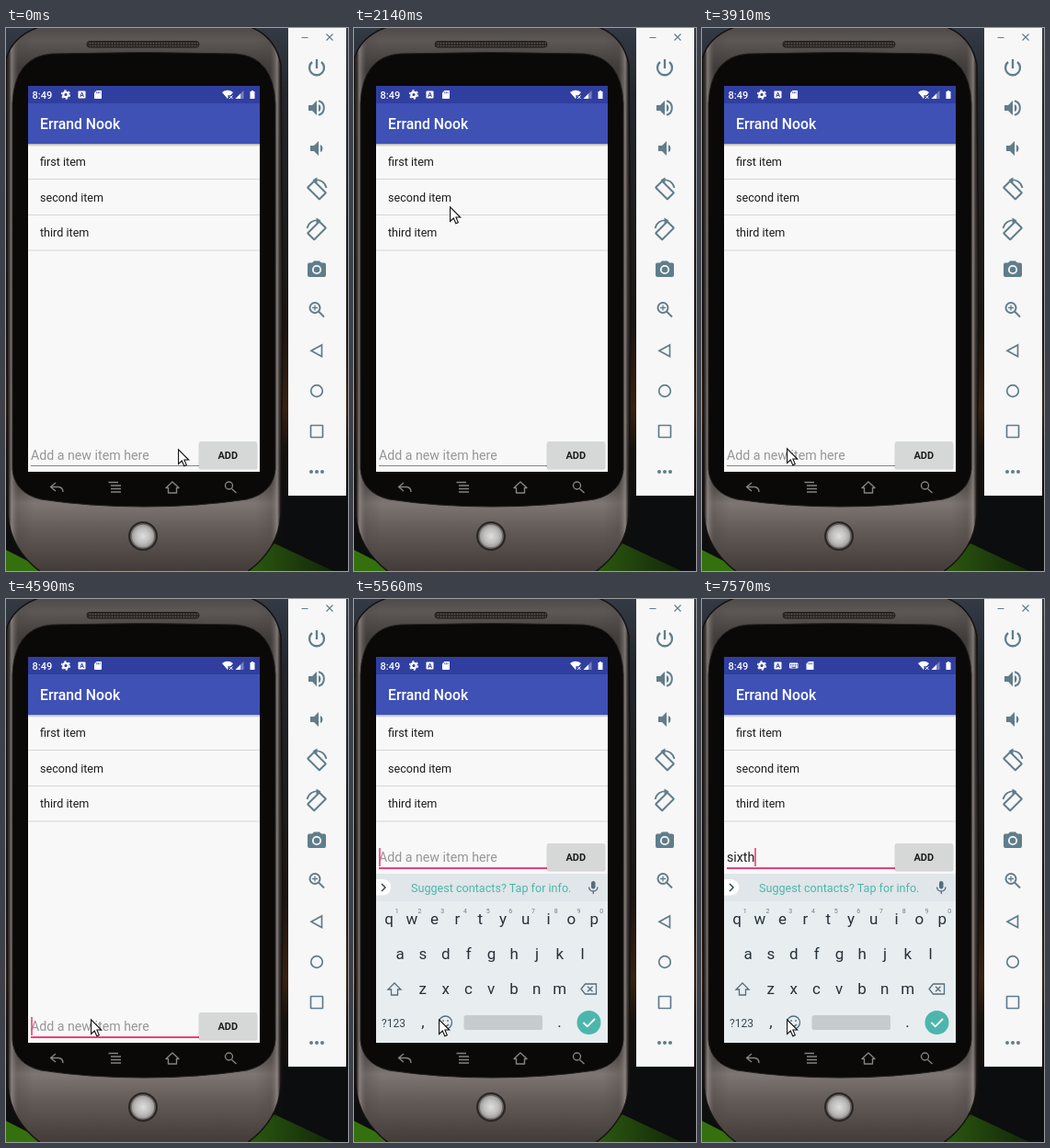
Write an HTML page that moves like this. It is 372x591 px and loops after 8000 ms.

```html
<!DOCTYPE html>
<html lang="en">
<head>
<meta charset="utf-8">
<title>Errand Nook</title>
<style>
html, body { margin: 0; width: 100%; height: 100%; overflow: hidden; background: #0b0d0e; }
svg { display: block; width: 372px; height: 591px; }
text { font-family: Roboto, Arial, sans-serif; fill: #1c1c1c; }
.item { font-size: 12.6px; }
.edit { font-size: 14.2px; }
.medium { font-weight: 500; }
.mid { text-anchor: middle; }
.key { font-size: 17px; fill: #263238; text-anchor: middle; }
.digit { font-size: 7px; fill: #6f7f87; text-anchor: middle; }
.line { fill: none; stroke: currentColor; stroke-width: 2; }
.tools { color: #607d8b; fill: #607d8b; }
.nav { color: #85827f; fill: none; stroke: currentColor; stroke-width: 1.4; stroke-linejoin: round; }

.anim, .type tspan { animation: 8s step-end infinite; }
#cursor { animation-name: move; }
#field { animation-name: pan; }
#hint { animation-name: hint; }
#accent { animation-name: focus; transform-origin: 92px 476px; }
#caret { animation-name: caret; }
#keyboard { animation-name: keyboard; }
#card { animation-name: card; }
#ime { animation-name: ime; }
.type tspan:nth-child(1) { animation-name: s; }
.type tspan:nth-child(2) { animation-name: i; }
.type tspan:nth-child(3) { animation-name: x; }
.type tspan:nth-child(4) { animation-name: t; }
.type tspan:nth-child(5) { animation-name: h; }

@keyframes move {
  0% { transform: translate(187px, 458px); }
  6.25% { transform: translate(206px, 458px); }
  8.125% { transform: translate(221px, 457px); }
  9.625% { transform: translate(186px, 453px); }
  11.5% { transform: translate(150px, 447px); }
  13% { transform: translate(119px, 444px); }
  14.875% { transform: translate(100px, 426px); }
  16.5% { transform: translate(64px, 284px); }
  18.375% { transform: translate(56px, 207px); }
  20.25% { transform: translate(64px, 209px); }
  21.75% { transform: translate(82px, 206px); }
  23.375% { transform: translate(97px, 202px); }
  25.25% { transform: translate(101px, 198px); }
  26.75% { transform: translate(104px, 194px); }
  28.25% { transform: translate(106px, 192px); }
  30.125% { transform: translate(106px, 191px); }
  35.5% { transform: translate(106px, 217px); }
  37% { transform: translate(106px, 300px); }
  38.5% { transform: translate(106px, 380px); }
  40.125% { transform: translate(98px, 446px); }
  41.625% { transform: translate(91px, 476px); }
  45% { transform: translate(91px, 475px); }
  47% { transform: translate(91px, 462px); }
  48.875%, 100% { transform: translate(92px, 457px); }
}
@keyframes pan {
  0% { transform: none; }
  64.375%, 100% { transform: translateY(-184px); }
}
@keyframes hint {
  0% { visibility: visible; }
  72.875%, 100% { visibility: hidden; }
}
@keyframes focus {
  0% { transform: scaleX(0); }
  55.875% { transform: scaleX(.6); }
  57.375%, 100% { transform: none; }
}
@keyframes caret {
  0% { opacity: 0; transform: none; }
  55.875% { opacity: 1; transform: none; }
  61.25% { opacity: 0; transform: none; }
  69.5% { opacity: 1; transform: none; }
  72.875% { opacity: 1; transform: translateX(7px); }
  81.625% { opacity: 1; transform: translateX(10.5px); }
  85.25% { opacity: 1; transform: translateX(17.5px); }
  89.125% { opacity: 1; transform: translateX(22.2px); }
  94.625%, 100% { opacity: 1; transform: translateX(30px); }
}
@keyframes keyboard {
  0% { visibility: hidden; }
  69.5%, 100% { visibility: visible; }
}
@keyframes card {
  0% { transform: none; }
  74.375% { transform: translateX(7px); }
  75.875% { transform: translateX(14px); }
  81.625%, 100% { transform: translateX(17.5px); }
}
@keyframes ime {
  0% { opacity: 0; }
  74.375% { opacity: .2; }
  75.875% { opacity: .6; }
  81.625%, 100% { opacity: 1; }
}
@keyframes s { 0% { visibility: hidden; } 72.875%, 100% { visibility: visible; } }
@keyframes i { 0% { visibility: hidden; } 81.625%, 100% { visibility: visible; } }
@keyframes x { 0% { visibility: hidden; } 85.25%, 100% { visibility: visible; } }
@keyframes t { 0% { visibility: hidden; } 89.125%, 100% { visibility: visible; } }
@keyframes h { 0% { visibility: hidden; } 94.625%, 100% { visibility: visible; } }
</style>
</head>
<body>
<svg viewBox="0 0 372 591" xmlns="http://www.w3.org/2000/svg">
  <defs>
    <linearGradient id="sky" x2="0" y2="1">
      <stop offset="0" stop-color="#343a45"/><stop offset=".12" stop-color="#22272d"/>
      <stop offset=".55" stop-color="#1b1511"/><stop offset=".7" stop-color="#38210f"/>
      <stop offset=".78" stop-color="#15110e"/><stop offset="1" stop-color="#0b0d0e"/>
    </linearGradient>
    <linearGradient id="body" x2="0" y2="1">
      <stop offset="0" stop-color="#4b4745"/><stop offset=".03" stop-color="#5d5855"/>
      <stop offset=".08" stop-color="#3d3937"/><stop offset=".83" stop-color="#4c4643"/>
      <stop offset=".87" stop-color="#7d7672"/><stop offset=".92" stop-color="#625a56"/>
      <stop offset="1" stop-color="#3f3936"/>
    </linearGradient>
    <linearGradient id="sides" gradientUnits="userSpaceOnUse" x1="0" x2="301" y1="0" y2="0">
      <stop offset="0" stop-color="#141110"/><stop offset=".012" stop-color="#3b3634" stop-opacity=".9"/>
      <stop offset=".02" stop-color="#8e8783" stop-opacity=".8"/><stop offset=".045" stop-color="#4a4441" stop-opacity=".3"/>
      <stop offset=".1" stop-color="#4a4441" stop-opacity="0"/><stop offset=".9" stop-color="#4a4441" stop-opacity="0"/>
      <stop offset=".955" stop-color="#4a4441" stop-opacity=".3"/><stop offset=".98" stop-color="#8e8783" stop-opacity=".8"/>
      <stop offset=".988" stop-color="#3b3634" stop-opacity=".9"/><stop offset="1" stop-color="#141110"/>
    </linearGradient>
    <linearGradient id="grass" x2="1">
      <stop offset="0" stop-color="#2c5a10"/><stop offset="1" stop-color="#122608"/>
    </linearGradient>
    <linearGradient id="shade" x2="0" y2="1">
      <stop offset="0" stop-opacity=".3"/><stop offset="1" stop-opacity="0"/>
    </linearGradient>
    <radialGradient id="ball">
      <stop offset="0" stop-color="#dededd"/><stop offset=".6" stop-color="#c0bebd"/>
      <stop offset="1" stop-color="#989593"/>
    </radialGradient>
    <pattern id="mesh" width="3" height="3" patternUnits="userSpaceOnUse">
      <rect width="3" height="3" fill="#2b2826"/><circle cx="1.5" cy="1.5" r=".8" fill="#5f5956"/>
    </pattern>
    <path id="case" d="M0 34Q8 5 46-4H256Q292 4 299 40L301 300L299 530Q296 570 258 595H42Q5 570 2 530Z"/>
  </defs>

  <rect width="372" height="591" fill="url(#sky)"/>
  <rect x="301" y="509" width="71" height="82" fill="#0b0d0e"/>
  <path d="M0 568L45 591H0Z" fill="#35700f"/>
  <path d="M262 591L292 561L356 591Z" fill="url(#grass)"/>

  <!-- phone body -->
  <use href="#case" fill="url(#body)"/>
  <use href="#case" fill="url(#sides)" stroke="#151211" stroke-width="1.500"/>
  <path d="M7 82Q9 31 50 28Q150 25 250 28Q291 31 293 82V480Q291 506 262 513Q210 521 150 521Q90 521 38 513Q9 506 7 480Z" fill="#0a0908" stroke="#242120"/>
  <rect x="88" y="14.500" width="122" height="6.500" rx="3.200" fill="url(#mesh)" stroke="#1f1c1b"/>
  <circle cx="149" cy="553" r="16" fill="#2a2725"/>
  <circle cx="149" cy="553" r="13" fill="url(#ball)" stroke="#6f6b68" stroke-width="1.5"/>

  <g class="nav">
    <path d="M54 495L48.500 499.500L54 504M49 499.500H57Q62 500 62 505"/>
    <path d="M111.500 494.500H122M114 498H125M114 501.500H125M114 505H125"/>
    <path d="M174 500.500L181 494L188 500.500H185.500V506H176.500V500.500Z"/>
    <path d="M245.500 501.500L250.500 506"/>
    <circle cx="242.500" cy="498" r="4"/>
  </g>

  <!-- app screen -->
  <rect x="24" y="63" width="252" height="420" fill="#f8f8f8"/>
  <rect x="24" y="63" width="252" height="19" fill="#303f9f"/>
  <rect x="24" y="82" width="252" height="44" fill="#3f51b5"/>
  <rect x="24" y="126" width="252" height="3" fill="url(#shade)"/>
  <text x="37" y="110" class="medium" style="font-size:15.75px;fill:#fff">Errand Nook</text>
  <text x="37" y="149.700" class="item">first item</text>
  <text x="37" y="188.500" class="item">second item</text>
  <text x="37" y="227.400" class="item">third item</text>
  <path d="M24 164.500H276M24 203.500H276M24 242H276" stroke="#d6d6d6"/>

  <g fill="#fff">
    <text x="28.500" y="77" class="medium" style="font-size:11px;fill:#fff">8:49</text>
    <circle cx="65" cy="72.500" r="2.700" fill="none" stroke="#fff" stroke-width="2.200"/>
    <circle cx="65" cy="72.500" r="4.500" fill="none" stroke="#fff" stroke-width="1.300" stroke-dasharray="2.400 2.312"/>
    <rect x="78.500" y="68.500" width="8" height="8" rx="1"/>
    <text x="82.500" y="75.300" class="mid" style="font-size:7px;font-weight:700;fill:#303f9f">A</text>
    <g id="ime" class="anim">
      <rect x="95" y="69.500" width="9.500" height="6" rx="1"/>
      <path d="M96 71.500H104M96 73H104" stroke="#303f9f" stroke-width=".9" stroke-dasharray="1 .7"/>
      <path d="M97.500 74.500H102" stroke="#303f9f" stroke-width=".8"/>
    </g>
    <g id="card" class="anim">
      <path d="M98.500 68H103.500Q104 68 104 68.700V76.300Q104 77 103.300 77H96.700Q96 77 96 76.300V70.500Z"/>
      <path d="M98.700 69.300V71.300M100.400 69.300V71.300M102.100 69.300V71.300" stroke="#303f9f" stroke-width=".8"/>
    </g>
    <path d="M235 70Q241 65.500 247 70L244.500 73H241.500V76.300L241 77Z"/>
    <path d="M243 73.500L246.500 77M246.500 73.500L243 77" stroke="#fff"/>
    <path d="M258.500 68V77H249.500Z" opacity=".35"/>
    <path d="M255 71.500V77H249.500Z"/>
    <path d="M265.500 69H267V68H269V69H270.500V77H265.500Z"/>
  </g>

  <g id="field" class="anim">
    <text id="hint" class="anim edit" x="27" y="470.300" style="fill:#969696">Add a new item here</text>
    <text class="edit type" x="27" y="470.300"><tspan>s</tspan><tspan>i</tspan><tspan>x</tspan><tspan>t</tspan><tspan>h</tspan></text>
    <path d="M27 476.500H211" stroke="#858585"/>
    <rect id="accent" class="anim" x="27" y="476" width="184" height="2" fill="#ec407a"/>
    <rect id="caret" class="anim" x="27.200" y="455" width="1.600" height="20" fill="#ec407a"/>
    <rect x="209.500" y="451" width="64" height="29.500" rx="2" opacity=".14"/>
    <rect x="210" y="450" width="63" height="29" rx="1.500" fill="#d6d7d7"/>
    <text x="241.300" y="468.500" class="mid" style="font-size:11px;font-weight:700">ADD</text>
  </g>

  <g id="keyboard" class="anim">
    <rect x="24" y="299" width="252" height="184" fill="#e8edf0"/>
    <rect x="24" y="299" width="252" height="30" fill="#e0e6e9"/>
    <path d="M24 305H31.500A8.800 8.800 0 0 1 31.500 322.600H24Z" fill="#fff"/>
    <path d="M30 310L34 314L30 318" class="line" style="color:#37474f;stroke-width:1.5"/>
    <text x="62" y="318.500" class="item" style="fill:#4db6ac">Suggest contacts? Tap for info.</text>
    <rect x="258" y="307" width="4.500" height="8.500" rx="2.200" fill="#546e7a"/>
    <path d="M255.500 313.500Q256 318 260.300 318Q264.500 318 265 313.500M260.300 318V321" class="line" style="color:#546e7a;stroke-width:1.300"/>
    <g id="keys"></g>
    <g class="line" style="color:#546e7a;stroke-width:1.300">
      <path d="M44 418L51 425H47.500V431H40.500V425H37Z"/>
      <path d="M247 424.500L251.500 419H263.500V430H251.500ZM254 421.700L259.500 427.300M259.500 421.700L254 427.300"/>
      <circle cx="99.500" cy="461" r="7"/>
      <path d="M96 463Q99.500 467 103 463M97 458V460M102 458V460"/>
    </g>
    <text x="30" y="465.500" style="font-size:12px;fill:#37474f">?123</text>
    <text x="75" y="466" class="key">,</text>
    <text x="223.500" y="466" class="key">.</text>
    <rect x="119.500" y="453" width="85.500" height="16" rx="2.500" fill="#c6cbce"/>
    <circle cx="255.500" cy="461" r="13" fill="#4db6ac"/>
    <path d="M249.500 461L253.800 465.300L262 457" fill="none" stroke="#fff" stroke-width="1.800"/>
  </g>

  <!-- emulator toolbar -->
  <rect x="307" width="63" height="509" fill="#f7f7f7"/>
  <g class="tools">
    <path class="line" style="stroke-width:1.200" d="M321.500 10.500H328.500M348.500 6.500L355.500 13.500M355.500 6.500L348.500 13.500"/>
    <path class="line" style="stroke-width:2.300" d="M338 34V44M333 37A8 8 0 1 0 343 37"/>
    <path d="M329 84H333L338 79V95L333 90H329ZM340 83Q342.500 84 342.500 87T340 91Z"/>
    <path class="line" d="M340 79.300A8 8 0 0 1 340 94.700"/>
    <path d="M331 128H335L340 123V139L335 134H331ZM342 127Q344.500 128 344.500 131T342 135Z"/>
    <g id="turn">
      <rect class="line" x="329" y="171.500" width="18" height="10" rx=".5" transform="rotate(45 338 176.500)"/>
      <path class="line" style="stroke-width:1.700" d="M335.500 165.500A11 11 0 0 1 348.500 174"/>
      <path d="M333.500 165.500L338.500 162.500V168.500Z"/>
    </g>
    <use href="#turn" transform="translate(676 44) scale(-1 1)"/>
    <path d="M335 253.500H341L343 255.500H346Q348 255.500 348 257.500V269Q348 271 346 271H330Q328 271 328 269V257.500Q328 255.500 330 255.500H333Z"/>
    <circle cx="338" cy="263" r="4.200" fill="none" stroke="#f7f7f7" stroke-width="1.800"/>
    <circle class="line" cx="336" cy="304.500" r="5.500"/>
    <path class="line" d="M340 308.500L346 314.500"/>
    <path class="line" style="stroke-width:1.300" d="M333 304.500H339M336 301.500V307.500"/>
    <path class="line" style="stroke-width:1.700" d="M343.500 345V357.500L332 351.200Z"/>
    <circle class="line" style="stroke-width:1.700" cx="338" cy="395" r="6.300"/>
    <rect class="line" style="stroke-width:1.700" x="331.500" y="432.500" width="13" height="13" rx=".5"/>
    <circle cx="332" cy="483" r="2"/><circle cx="338" cy="483" r="2"/><circle cx="344" cy="483" r="2"/>
  </g>

  <g id="cursor" class="anim">
    <path d="M.6.8V16.500L4.300 13L6.800 18.700L9.300 17.600L6.900 12H11.700Z" fill="#fff" stroke="#111" stroke-width="1.100"/>
  </g>
</svg>
<script>
const keys = document.getElementById('keys');

function label(text, cls, x, y) {
  const el = document.createElementNS('http://www.w3.org/2000/svg', 'text');
  el.setAttribute('class', cls);
  el.setAttribute('x', x);
  el.setAttribute('y', y);
  el.textContent = text;
  keys.append(el);
}

function row(letters, x, y) {
  [...letters].forEach((c, i) => label(c, 'key', x + i * 24.8, y));
}

row('qwertyuiop', 38, 354);
row('asdfghjkl', 50.2, 391.5);
row('zxcvbnm', 74.8, 430);
[...'1234567890'].forEach((c, i) => label(c, 'digit', 46.8 + i * 24.7, 342));
</script>
</body>
</html>
```
